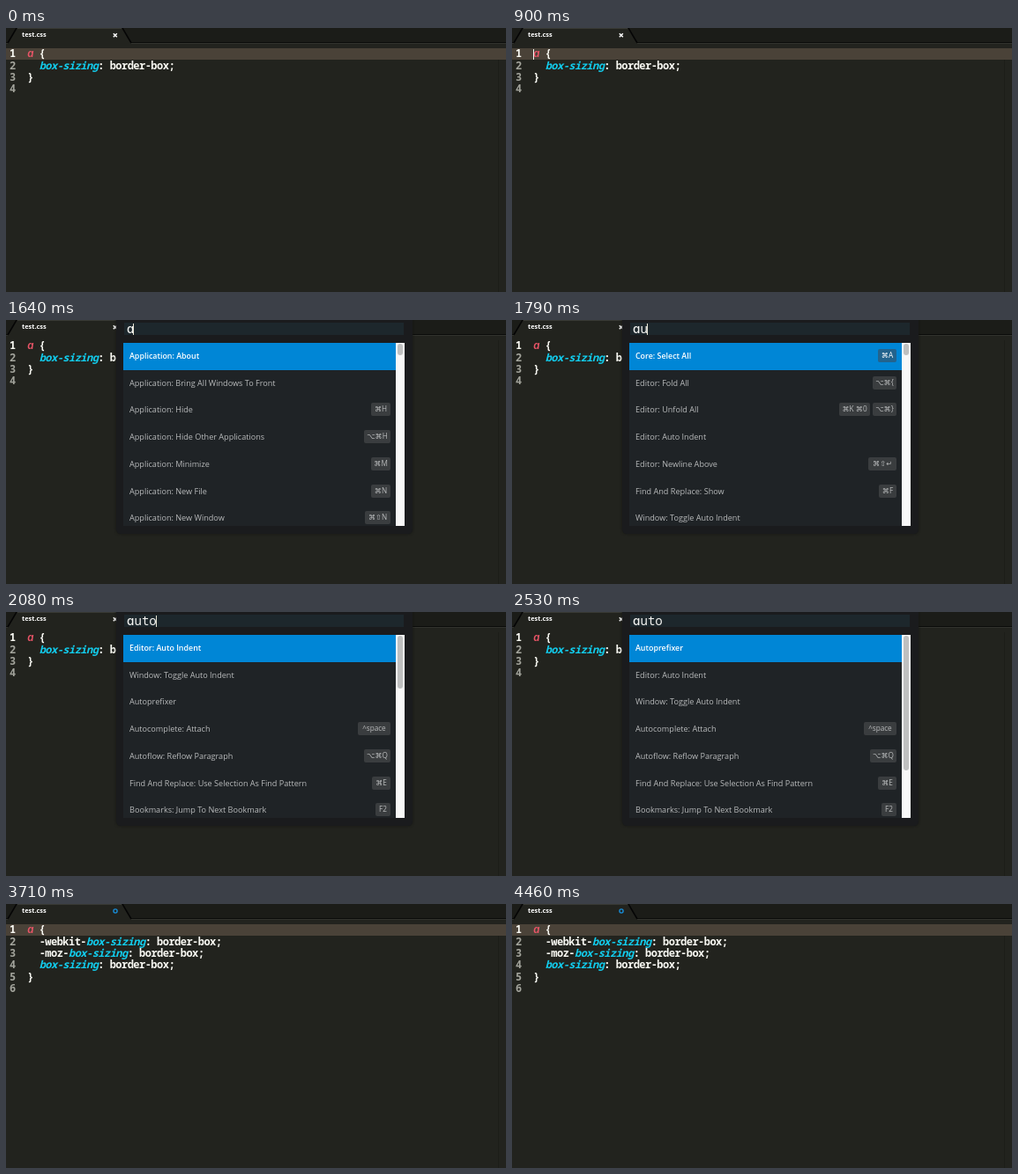
Recreate the animation shown at these times as an HTML page. Size 567 by 300 pixels, loop 4.9 s.

```html
<!DOCTYPE html>
<html lang="en">
<head>
<meta charset="utf-8">
<title>Editor command palette</title>
<style>
  html, body { margin: 0; width: 100%; height: 100%; overflow: hidden; background: #22231e; }
  #stage { position: relative; width: 567px; height: 300px; overflow: hidden; background: #22231e;
           font: 500 9.1px/1 'Open Sans', 'DejaVu Sans', sans-serif; }
  #stage div, #stage svg { position: absolute; }
  [hidden] { display: none !important; }

  .tab { left: 18px; top: 2px; font-size: 7.4px; line-height: 11px; font-weight: 700; color: #fff; }
  .guide { left: 558px; top: 23px; width: 1px; height: 277px; background: #1c1d18; }
  .active { left: 0; top: 23px; width: 567px; height: 13px; background: #4a4238; }

  .code { left: 0; top: 22.4px; color: #f8f8f2; white-space: pre; letter-spacing: -.53px;
          font: 600 12px/13.33px 'Noto Sans Mono', 'DejaVu Sans Mono', monospace; }
  .code div { left: 24.3px; }
  .code .num { left: 4px; color: #a3a49c; }
  .code .num.on { color: #f8f8f2; }
  .code i { color: #12cdee; }
  .round { font-family: Inter, sans-serif; font-feature-settings: 'cv11'; display: inline-block; }
  .code .round { width: 6.67px; color: #ec5568; font-size: 11.5px; font-style: italic; }
  .caret { width: 1px; background: #f4f4ee; }

  .palette { left: 125px; top: -8px; width: 336px; height: 251px; border-radius: 5px;
             background: #1a1b1d; box-shadow: 0 0 3px #141513; }
  .field { left: 134px; top: 3px; width: 317px; height: 14px; background: #1d272c; }
  .query { left: 137px; top: 2px; color: #f2f2f0; white-space: pre;
           font: 500 14.1px/16px 'Noto Sans Mono', 'DejaVu Sans Mono', monospace; }
  .query .round { font-size: 13.5px; width: 8.46px; }
  .query u { display: inline-block; width: 1px; height: 13px; margin-left: -1px; vertical-align: -2px; background: #e6e3d2; }

  .list { left: 133px; top: 26px; width: 319px; height: 208px; overflow: hidden; background: #1f2326; }
  .row { left: 0; width: 309px; height: 30.7px; line-height: 29.6px; color: #b8babb; white-space: pre; }
  .row span { position: absolute; left: 7px; }
  .row:first-child { background: #0086d6; color: #fff; font-size: 8.9px; font-weight: 600; }
  .row .key { top: 7px; height: 15px; border-radius: 2px; background: #3a3d3f; color: #b9bbbc;
              font-size: 8.2px; line-height: 14.5px; font-weight: 500; text-align: center; }
  .row:first-child .key { background: #23638d; color: #fff; }
  .track { left: 309px; top: 0; width: 10px; height: 208px; background: #f8f8f8; }
  .thumb { left: 2px; top: 1px; width: 6px; border-radius: 3px; background: #bfc0c0; }
</style>
</head>
<body>
<div id="stage">
  <svg width="567" height="24" viewBox="0 0 567 24">
    <rect width="567" height="16" fill="#1b1c18"/>
    <path d="M0 16.5H567" stroke="#0b0c0a"/>
    <path d="M0 17.5H567" stroke="#31322d"/>
    <path d="M2 18L12 0H132L142 18Z" fill="#22231e"/>
    <path d="M2 17L12 0M132 0L142 17" fill="none" stroke="#050505" stroke-width="1.5"/>
    <path d="M13 .5H131" stroke="#383934"/>
    <path data-on="0-3420" d="M121.8 6.3l4 4m0-4l-4 4" stroke="#fff" stroke-width="1.5"/>
    <circle data-on="3420-4900" cx="124" cy="8" r="2.1" fill="none" stroke="#188fdc" stroke-width="1.3"/>
  </svg>
  <div class="tab">test.css</div>
  <div class="guide"></div>
  <div class="active" data-on="0-1190 2980-4900"></div>
</div>

<script>
const LOOP = 4900, ROW = 30.7, LINE = 13.33;
const stage = document.getElementById('stage');

function add(parent, cls, html = '', on = '', css = '') {
  const el = document.createElement('div');
  el.className = cls;
  el.innerHTML = html;
  el.style.cssText = css;
  if (on) el.dataset.on = on;
  return parent.appendChild(el);
}

const round = s => s.replace(/^a/, '<span class="round">a</span>');

// Editor contents
function addCode(on, prefixes) {
  const box = add(stage, 'code', '', on);
  const lines = ['a {', ...prefixes.map(p => `  ${p}<i>box-sizing</i>: border-box;`), '}', ''];
  lines.forEach((text, i) => {
    const top = `top:${i * LINE}px`;
    add(box, i ? 'num' : 'num on', i + 1, '', top);
    add(box, '', round(text), '', top);
  });
}
addCode('0-3130', ['']);
addCode('3130-4900', ['-webkit-', '-moz-', '']);
add(stage, 'caret', '', '150-450 900-1190 3270-3710 4160-4460', 'left:24px;top:24px;height:12px');

// Command palette: each row is "label|key:width|key:width"
const palette = add(stage, '', '', '1190-2980');
add(palette, 'palette');
add(palette, 'field');

function addList(on, thumb, rows) {
  const list = add(palette, 'list', '', on);
  rows.forEach((row, i) => {
    const [label, ...keys] = row.split('|');
    const el = add(list, 'row', `<span>${label}</span>`, '', `top:${i * ROW}px`);
    let right = 6;
    keys.reverse().forEach(key => {
      const [text, width] = key.split(':');
      add(el, 'key', text, '', `right:${right}px;width:${width}px`);
      right += +width + 3;
    });
  });
  const track = add(list, 'track');
  add(track, 'thumb', '', '', `height:${thumb}px`);
}

const indent = 'Editor: Auto Indent', toggle = 'Window: Toggle Auto Indent';
const shared = ['Autocomplete: Attach|^space:37', 'Autoflow: Reflow Paragraph|⌥⌘Q:30',
  'Find And Replace: Use Selection As Find Pattern|⌘E:21', 'Bookmarks: Jump To Next Bookmark|F2:17'];

addList('1190-1790', 13, [
  'Application: About', 'Application: Bring All Windows To Front', 'Application: Hide|⌘H:22',
  'Application: Hide Other Applications|⌥⌘H:30', 'Application: Minimize|⌘M:22',
  'Application: New File|⌘N:22', 'Application: New Window|⌘⇧N:29'
]);
addList('1790-1930', 13, [
  'Core: Select All|⌘A:21', 'Editor: Fold All|⌥⌘{:27', 'Editor: Unfold All|⌘K ⌘0:35|⌥⌘}:27',
  indent, 'Editor: Newline Above|⌘⇧↵:32', 'Find And Replace: Show|⌘F:20', toggle
]);
addList('1930-2230', 60, [indent, toggle, 'Autoprefixer', ...shared]);
addList('2230-2980', 153, ['Autoprefixer', indent, toggle, ...shared]);

const caret = on => `<u data-on="${on}"></u>`;
[['', '1190-1640', '1190-1340'], ['a', '1640-1790', '1640-1790'],
 ['au', '1790-2080', '1790-2080'], ['auto', '2080-2980', '2080-2530']]
  .forEach(([text, on, blink]) => add(palette, 'query', round(text) + caret(blink), on));

// Show every part only inside its time spans
const parts = [...document.querySelectorAll('[data-on]')].map(el => ({
  el, spans: el.dataset.on.split(' ').map(s => s.split('-').map(Number))
}));
const start = performance.now();

function draw() {
  const t = (performance.now() - start) % LOOP;
  for (const { el, spans } of parts)
    el.toggleAttribute('hidden', !spans.some(([a, b]) => t >= a && t < b));
  requestAnimationFrame(draw);
}
draw();
</script>
</body>
</html>
```
